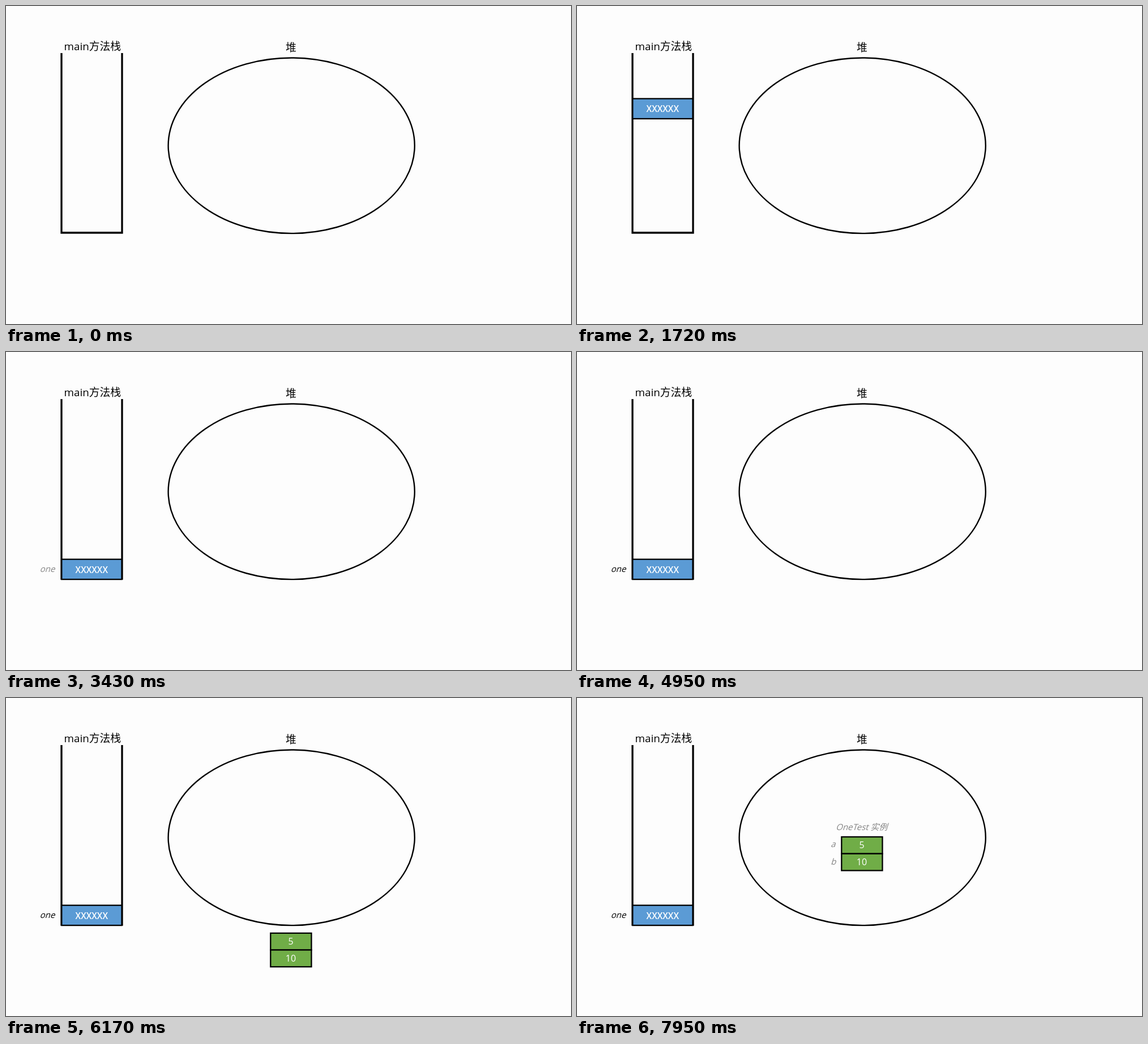
An HTML page for the animation above (7.99 s loop, 998 px wide and 561 px high).

```html
<!DOCTYPE html>
<html lang="zh">
<head>
<meta charset="utf-8">
<style>
  html, body { margin: 0; width: 100%; height: 100%; overflow: hidden; background: #fdfdfd; }
  svg { display: block; width: 998px; height: 561px; }
  text { font: 15px "Open Sans", "Noto Sans CJK SC", "Noto Sans CJK", "Noto Sans", sans-serif; }
  .title { font-size: 18.8px; }
  .line { fill: none; stroke: #000; stroke-width: 2.4; }
  .box rect { stroke: #000; stroke-width: 2.3; }
  .box text { fill: #fff; font-size: 16px; text-anchor: middle; }
  #ref rect { fill: #5b9bd5; }
  #ref text { font-size: 15.4px; font-weight: 600; }
  #obj rect { fill: #70ad47; }
</style>
</head>
<body>
<svg viewBox="0 0 998 561">
  <text class="title" x="102.5" y="77.5">main方法栈</text>
  <text class="title" x="503.5" y="80" text-anchor="middle">堆</text>
  <path class="line" style="stroke-width:3.3" d="M98 83V400H205V83M96.4 400H206.6"/>
  <ellipse class="line" cx="504.2" cy="246.3" rx="217.6" ry="154.8"/>

  <g id="ref" class="box">
    <rect x="98.3" y="365.7" width="106.2" height="35.4"/>
    <text x="151.3" y="389.5">XXXXXX</text>
  </g>

  <g id="obj" class="box">
    <rect x="467.3" y="245" width="72.2" height="29.7"/>
    <rect x="467.3" y="274.7" width="72.2" height="29.7"/>
    <text x="503" y="265">5</text>
    <text x="503" y="295.3">10</text>
  </g>

  <g id="refName">
    <text transform="translate(59.5 388) skewX(-17)">one</text>
  </g>
  <g id="objNames">
    <text transform="translate(457 233) skewX(-17)">OneTest 实例</text>
    <text transform="translate(448 262.5) skewX(-17)">a</text>
    <text transform="translate(448 294) skewX(-17)">b</text>
  </g>
</svg>
<script>
const LOOP = 7990, FLY = 1471, FADE = 1000;
const get = id => document.getElementById(id);
const progress = (t, start, length) => Math.min(1, Math.max(0, (t - start) / length));

// Slide linearly from an offset back to the resting place.
function fly(id, t, start, offset) {
  const y = offset * (1 - progress(t, start, FLY));
  get(id).setAttribute("transform", `translate(0 ${y})`);
  get(id).style.visibility = t < start ? "hidden" : "visible";
}

function fade(id, t, start) {
  get(id).style.opacity = progress(t, start, FADE);
}

function draw(now) {
  const t = now % LOOP;
  fly("ref", t, 990, -402);
  fly("obj", t, 5488, 317);
  fade("refName", t, 2960);
  fade("objNames", t, 7475);
  requestAnimationFrame(draw);
}
draw(0);
</script>
</body>
</html>
```
